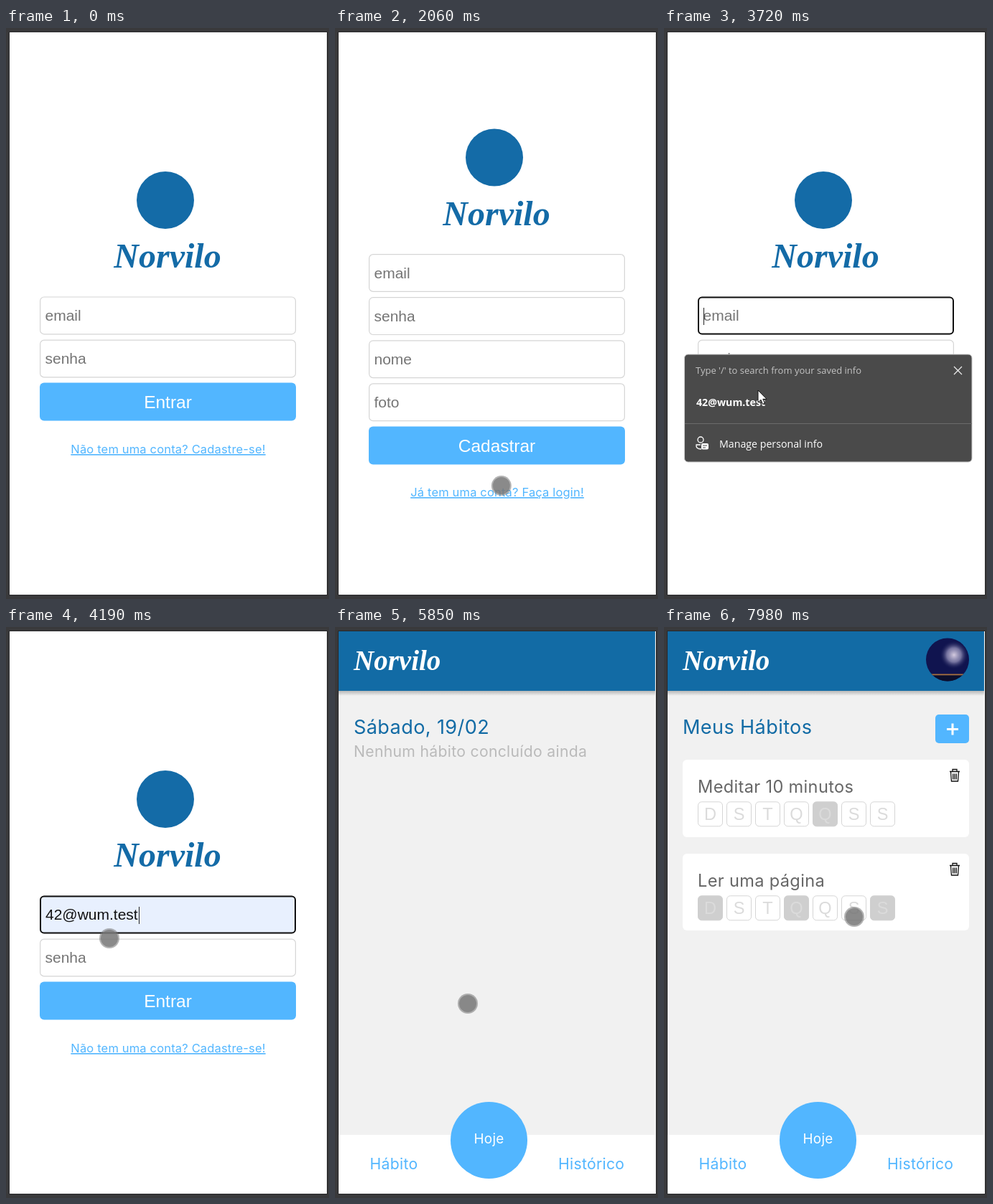
These frames come from a looping animation (450x796 px, 8 s). An HTML page:

```html
<!DOCTYPE html>
<html lang="pt">
<head>
<meta charset="utf-8">
<title>Hábitos</title>
<style>
html, body { margin: 0; width: 100%; height: 100%; overflow: hidden; background: #39393b; }
svg { display: block; width: 100%; height: 100%; }
text { font-family: Inter, sans-serif; letter-spacing: .014em; white-space: pre; }
.ui { font-family: "Liberation Sans", Arial, sans-serif; letter-spacing: 0; }
.sys { font-family: "Open Sans", sans-serif; letter-spacing: 0; }
.brand { font: italic bold 48px "Liberation Serif", serif; letter-spacing: 0; }
.mid { text-anchor: middle; }
.link { font-size: 16.5px; fill: #52b6ff; text-decoration: underline; text-anchor: middle; letter-spacing: .01em; }
</style>
</head>
<body>
<svg id="stage" viewBox="0 0 450 796"></svg>
<script>
const LOOP = 8000, BLUE = '#126ba5', SKY = '#52b6ff', GREY = '#666', PALE = '#bababa';
const BRAND = 'Norvilo', MAIL = '42@wum.test';
const ROW = 60.1, LOGIN_Y = 374.4, SIGNUP_Y = 315, PASS_Y = LOGIN_Y + ROW;

const text = (x, y, size, fill, str, cls = '', more = '') =>
  `<text x="${x}" y="${y}" font-size="${size}" fill="${fill}" class="${cls}" ${more}>${str}</text>`;
const rect = (x, y, w, h, r, fill, more = '') =>
  `<rect x="${x}" y="${y}" width="${w}" height="${h}" rx="${r}" fill="${fill}" ${more}/>`;
const group = (id, body) => `<g id="${id}">${body}</g>`;

const box = y => rect(47.6, y + .6, 355.8, 51.8, 5.5, '#fff', 'stroke="#d5d5d5" stroke-width="1.18"');
const field = (y, label) => box(y) + text(54.5, y + 33.6, 21, '#757575', label, 'ui');
const focus = y => rect(48, y + 1, 355, 51, 5, 'none', 'stroke="#101010" stroke-width="2"');
const caret = (x, y) => rect(x, y + 15.6, 1, 24, 0, '#222');
const button = (y, label) => rect(47, y, 357, 53, 6, SKY) + text(225.5, y + 35.5, 24.5, '#fff', label, 'ui mid');
const form = (y, labels, action) => labels.map((s, i) => field(y + i * ROW, s)).join('') + button(y + labels.length * ROW, action);
const logo = dy => `<g transform="translate(0 ${dy})"><circle cx="222" cy="240" r="40" fill="#146ba7"/>` +
  text(225, 334, 48, '#146ba7', BRAND, 'brand mid') + '</g>';

const login = logo(0) + form(LOGIN_Y, ['email', 'senha'], 'Entrar') +
  '<text class="link" x="226" y="593">Não tem uma conta? Cadastre-se!</text>' +
  group('mailFocus', caret(55, LOGIN_Y)) +
  group('mailFill', rect(48, 375.4, 355, 51, 5, '#e8f0fe') + text(55, 408, 21, '#111', MAIL, 'ui')) +
  group('mailRing', focus(LOGIN_Y)) +
  group('mailCaret', caret(185, LOGIN_Y)) +
  group('pass', box(PASS_Y) + focus(PASS_Y) +
    group('passHint', text(54.5, PASS_Y + 33.6, 21, '#757575', 'senha', 'ui')) +
    [0, 1, 2].map(i => `<circle id="dot${i}" cx="${59 + i * 7.5}" cy="461" r="3.2" fill="#111"/>`).join('') +
    '<rect id="passCaret" y="450" width="1" height="24" fill="#222"/>' +
    group('eye', '<path d="M374 463Q384 449 394 463" fill="none" stroke="#333" stroke-width="1.6"/>' +
      '<circle cx="384" cy="463" r="3.6" fill="none" stroke="#333" stroke-width="1.6"/>')) +
  group('popup', rect(28.5, 455, 400.5, 150, 5, '#4a4a4a', 'stroke="#c4c4c4" stroke-width="1"') +
    text(44, 482, 13, '#c3c3c3', "Type '/' to search from your saved info", 'sys') +
    '<path d="M404 472l11 11m0-11l-11 11" stroke="#eee" stroke-width="1.2"/>' +
    text(45, 527, 14.2, '#fff', MAIL, 'sys', 'font-weight="700"') +
    rect(29, 551, 400, 1, 0, '#6b6b6b') +
    text(77, 585, 14.2, '#fff', 'Manage personal info', 'sys') +
    '<g fill="none" stroke="#fff" stroke-width="1.3"><circle cx="51" cy="574" r="4"/><path d="M52 587Q44 587 45 581H51"/></g>' +
    rect(52, 579, 10, 8.5, 2, '#fff') + '<path d="M54 582h6m-6 3h4" stroke="#4a4a4a"/>');

const signup = logo(-59.5) + form(SIGNUP_Y, ['email', 'senha', 'nome', 'foto'], 'Cadastrar') +
  '<text class="link" x="226" y="653">Já tem uma conta? Faça login!</text>';

const shell = rect(5, 6, 441, 702, 0, '#f1f1f1') + rect(5, 89, 441, 7, 0, 'url(#shade)') +
  rect(5, 6, 441, 83, 0, BLUE) + text(26, 60, 39, '#fff', BRAND, 'brand', 'style="font-size:39px"') +
  group('avatar', '<g clip-path="url(#round)">' + rect(365, 15, 60, 61, 0, '#10144f') +
    '<circle cx="404" cy="39" r="20" fill="url(#burst)"/>' +
    rect(365, 65.5, 60, 2, 0, '#a8713c') + rect(365, 67.5, 60, 9, 0, '#0c0e2c') + '</g>') +
  '<circle cx="214.5" cy="715.5" r="53.5" fill="#52b6ff"/>' +
  text(214.5, 720, 18.9, '#fff', 'Hoje', 'mid') +
  text(48.5, 756, 21.2, SKY, 'Hábito') + text(311, 756, 21.2, SKY, 'Histórico');

const today = text(26, 149, 27.1, BLUE, 'Sábado, 19/02') +
  text(26, 181, 21.2, PALE, 'Nenhum hábito concluído ainda') +
  group('todayCard', rect(26, 220, 399, 110, 6, '#fff') +
    text(41, 259, 23.6, GREY, 'Ler uma página') +
    text(41, 285, 15.3, GREY, 'Sequência atual: 1 dias') +
    text(41, 311, 15.3, GREY, 'Seu recorde: 1 dias') +
    rect(329.5, 235.5, 80, 80, 6, '#ebebeb', 'stroke="#e7e7e7"') +
    '<path d="M355 277l10 10 19-21" fill="none" stroke="#fff" stroke-width="7" stroke-linecap="round" stroke-linejoin="round"/>');

const bin = y => `<path transform="translate(405 ${y})" d="M-7-5.5H7M-3-6V-8.5H3V-6M-5.5-5L-4.5 8H4.5L5.5-5M-2.3-2.5V5.5M0-2.5V5.5M2.3-2.5V5.5" fill="none" stroke="#111" stroke-width="1.3"/>`;
const habit = (y, h, name, picked) => rect(26, y, 399, h, 6, '#fff') + text(47, y + 45.5, 23.6, GREY, name) +
  [...'DSTQQSS'].map((day, i) => {
    const on = picked.includes(i);
    return rect(47.5 + i * 40, y + 58.8, 34, 34, 5, on ? '#cfcfcf' : '#fff', `stroke="${on ? '#cfcfcf' : '#d5d5d5'}"`) +
      text(64.5 + i * 40, y + 84.3, 23.6, '#dbdbdb', day, 'ui mid');
  }).join('') + bin(y + 22);

const habits = text(26, 149, 27.1, BLUE, 'Meus Hábitos') + rect(378, 122, 47, 40, 5, SKY) +
  '<path d="M394 142.5h16m-8-8v16" stroke="#fff" stroke-width="3"/>' +
  group('noHabits', ['Você não tem nenhum hábito', 'cadastrado ainda. Adicione um hábito', 'para começar a evoluir!']
    .map((s, i) => text(26, 202 + i * 26.5, 21.2, PALE, s)).join('')) +
  group('habitCards', habit(185, 108, 'Meditar 10 minutos', [4]) + habit(316, 107, 'Ler uma página', [0, 3, 6]));

const pointer = '<g id="pointer">' +
  group('idle', '<circle r="14" fill="#777" opacity=".55"/><circle r="12" fill="#777" opacity=".7"/>') +
  group('press', '<circle r="15" fill="#d2cc3c" opacity=".62"/><circle r="11.5" fill="#aaa41c" opacity=".62"/>') +
  group('arrow', '<path d="M0 0V17L4 13.3 6.6 19.4 9.4 18.2 6.8 12.3H12Z" fill="#fff" stroke="#111"/>') + '</g>';

document.getElementById('stage').innerHTML = `<defs>
  <linearGradient id="shade" x2="0" y2="1"><stop stop-color="#000" stop-opacity=".24"/><stop offset="1" stop-color="#000" stop-opacity="0"/></linearGradient>
  <radialGradient id="burst"><stop stop-color="#d5cbe0"/><stop offset=".5" stop-color="#8f8cb4" stop-opacity=".8"/><stop offset="1" stop-color="#10144f" stop-opacity="0"/></radialGradient>
  <clipPath id="round"><circle cx="395" cy="45.5" r="30"/></clipPath></defs>` +
  rect(0, 0, 450, 796, 0, '#39393b') + rect(4.5, 5.5, 443, 785, 0, '#fff', 'stroke="#29292b"') +
  group('login', login) + group('signup', signup) +
  group('shell', shell) + group('today', today) + group('habits', habits) + pointer;

const el = {};
document.querySelectorAll('#stage [id]').forEach(n => el[n.id] = n);

// time, x, y
const path = [
  [60, 411, 779], [270, 340, 693], [480, 267, 612], [660, 254, 594], [1640, 254, 594],
  [2040, 232, 638], [2310, 225, 643], [2840, 225, 643], [3230, 142, 415], [3400, 142, 415],
  [3630, 131, 505], [3730, 131, 505], [3860, 136, 521], [3930, 136, 521], [4150, 144, 434],
  [4360, 144, 434], [4400, 144, 441], [4840, 144, 441], [5080, 185, 530], [5300, 185, 530],
  [5400, 185, 525], [5900, 185, 525], [6100, 172, 556], [6600, 108, 712], [6860, 95, 746],
  [7550, 95, 746], [7660, 137, 690], [7790, 236, 470], [7910, 265, 404], [8000, 265, 404]
];
const clicks = [[1070, 1340], [2520, 2670], [3270, 3420], [4390, 4460], [5310, 5450], [7050, 7310]];

function pointerAt(t) {
  const i = Math.max(1, path.findIndex(p => p[0] > t));
  const [a, b] = [path[i - 1], path[i]];
  const k = Math.max(0, (t - a[0]) / (b[0] - a[0]));
  return [a[1] + (b[1] - a[1]) * k, a[2] + (b[2] - a[2]) * k];
}

function draw(t) {
  const within = (a, b = LOOP) => t >= a && t < b;
  const show = (id, on) => el[id].style.display = on ? '' : 'none';

  show('signup', within(1270, 2590));
  show('login', within(0, 1270) || within(2590, 5580));
  show('shell', within(5580));
  show('today', within(5580, 7240));
  show('habits', within(7240));

  show('mailFocus', within(3330, 3800));
  show('mailFill', within(3800, 5580));
  show('mailRing', within(3330, 4390));
  show('mailCaret', within(3930, 4390));
  show('popup', within(3410, 3930));

  const typed = [4660, 4730, 4800].filter(s => t >= s).length;
  show('pass', within(4390, 5580));
  show('passHint', !typed);
  for (let i = 0; i < 3; i++) show('dot' + i, i < typed);
  el.passCaret.setAttribute('x', 55 + typed * 7.5);
  show('eye', typed);

  show('todayCard', within(6120));
  show('avatar', within(6190));
  show('noHabits', within(7240, 7580));
  show('habitCards', within(7580));

  // the pointer is sampled about fifteen times a second
  const [x, y] = pointerAt(Math.floor(t / 66) * 66);
  const arrow = within(3410, 3930) && y > 455;
  const press = !arrow && clicks.some(c => within(...c));
  show('pointer', within(70));
  show('arrow', arrow);
  show('press', press);
  show('idle', !arrow && !press);
  el.pointer.setAttribute('transform', `translate(${x.toFixed(1)} ${y.toFixed(1)})`);
}

const start = performance.now();
function tick() {
  draw((performance.now() - start) % LOOP);
  requestAnimationFrame(tick);
}
tick();
</script>
</body>
</html>
```
